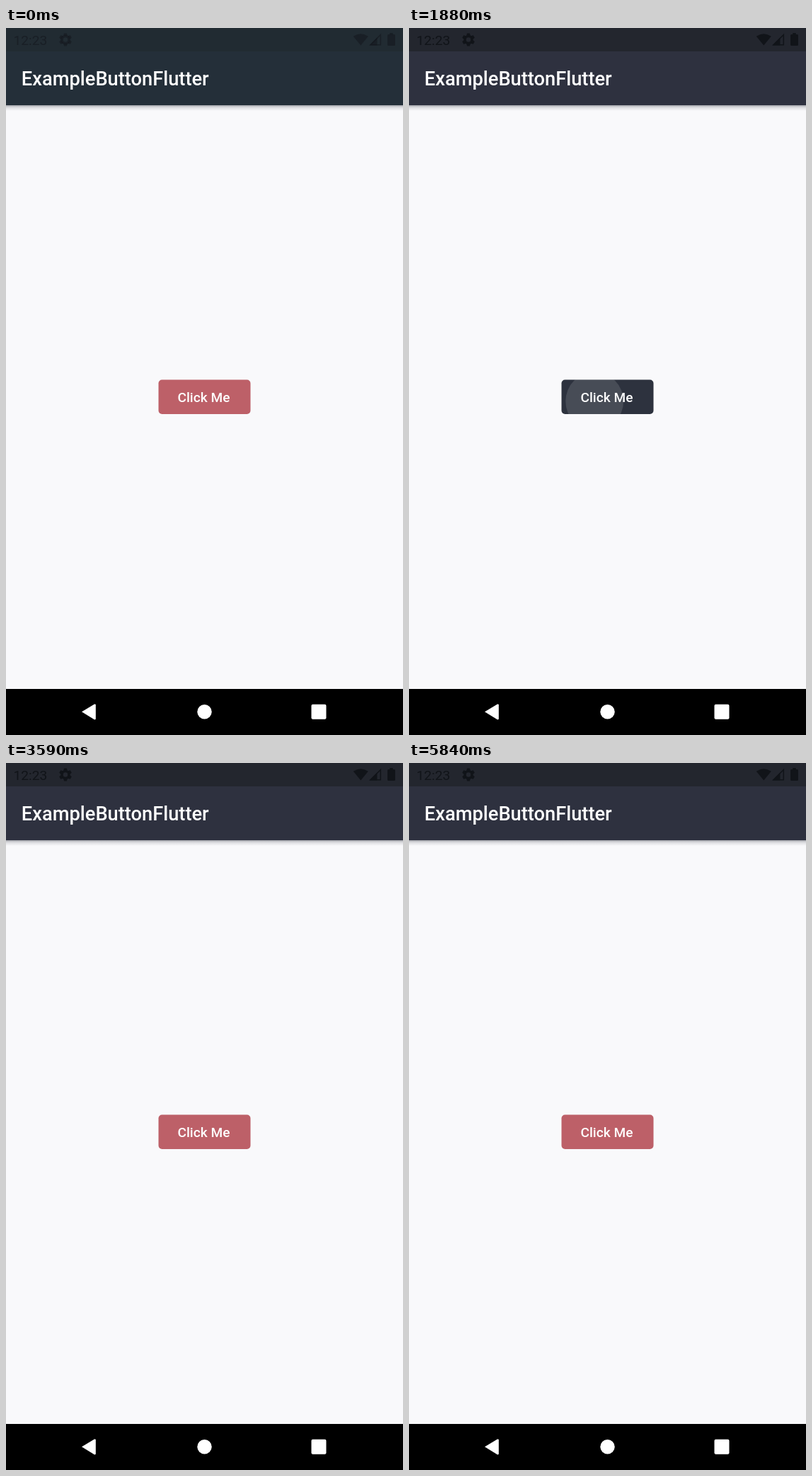
Animation, 561 px wide and 998 px high, one loop 5880 ms. Source, as an HTML page with a canvas:

```html
<!DOCTYPE html>
<html lang="en">
<head>
<meta charset="utf-8">
<title>ExampleButtonFlutter</title>
<style>
  html, body { margin: 0; width: 100%; height: 100%; overflow: hidden; background: #f9f9fb; }
  canvas { display: block; width: 561px; height: 998px; }
</style>
</head>
<body>
<canvas id="stage" width="561" height="998"></canvas>
<script>
const ctx = document.getElementById('stage').getContext('2d');
const LOOP = 5880;
const RED = '#bd6068', DARK = '#2d323e';
const BUTTON = { x: 215.5, y: 496.5, w: 130, h: 48.5, r: 5 };
const TAPS = [1760, 3060, 3760, 4960];
const TOGGLE_DELAY = 60;

const clamp = v => Math.max(0, Math.min(1, v));
const mix = (a, b, k) => a + (b - a) * k;
const smooth = k => k * k * (3 - 2 * k);

function rect(color, x, y, w, h) {
  ctx.fillStyle = color;
  ctx.fillRect(x, y, w, h);
}

function disc(color, x, y, r) {
  ctx.fillStyle = color;
  ctx.beginPath();
  ctx.arc(x, y, r, 0, Math.PI * 2);
  ctx.fill();
}

function polygon(color, points) {
  ctx.fillStyle = color;
  ctx.beginPath();
  points.forEach(([x, y]) => ctx.lineTo(x, y));
  ctx.closePath();
  ctx.fill();
}

function rounded(color, x, y, w, h, r) {
  ctx.fillStyle = color;
  ctx.beginPath();
  ctx.roundRect(x, y, w, h, r);
  ctx.fill();
}

function label(text, x, y, size, weight, color) {
  ctx.font = `${weight} ${size}px Roboto, sans-serif`;
  ctx.fillStyle = color;
  ctx.fillText(text, x, y);
}

function gear(color, x, y) {
  ctx.save();
  ctx.translate(x, y);
  ctx.fillStyle = color;
  ctx.beginPath();
  ctx.arc(0, 0, 6.6, 0, Math.PI * 2);
  ctx.arc(0, 0, 3.2, 0, Math.PI * 2, true);
  ctx.fill();
  for (let i = 0; i < 6; i++) {
    polygon(color, [[-2.8, -5.6], [-1.9, -9], [1.9, -9], [2.8, -5.6]]);
    ctx.rotate(Math.PI / 3);
  }
  ctx.restore();
}

function statusIcons(color) {
  label('12:23', 10.5, 24, 19.2, 400, color);
  gear(color, 84, 16.5);
  // Wi-Fi fan
  ctx.fillStyle = color;
  ctx.beginPath();
  ctx.moveTo(501.3, 24.5);
  ctx.lineTo(490.8, 11.7);
  ctx.quadraticCurveTo(501.3, 4.6, 511.8, 11.7);
  ctx.fill();
  // Signal strength
  polygon(color, [[513.5, 24.5], [524.5, 13.5], [524.5, 24.5]]);
  ctx.strokeStyle = color;
  ctx.lineWidth = 1.5;
  ctx.beginPath();
  ctx.moveTo(515, 23.8);
  ctx.lineTo(529.3, 9.5);
  ctx.lineTo(529.3, 23.8);
  ctx.closePath();
  ctx.stroke();
  // Battery
  rounded(color, 539, 9, 11, 16, 1.5);
  rect(color, 542.3, 7, 4.4, 2.5);
}

function appBar(sharpness) {
  const shade = (from, to) => `rgb(${from.map((c, i) => mix(c, to[i], sharpness)).join(',')})`;
  const shadow = ctx.createLinearGradient(0, 109, 0, 117);
  shadow.addColorStop(0, 'rgba(30,34,45,.38)');
  shadow.addColorStop(.4, 'rgba(30,34,45,.13)');
  shadow.addColorStop(1, 'rgba(30,34,45,0)');
  rect(shadow, 0, 109, 561, 8);
  rect(shade([36, 47, 57], [46, 49, 63]), 0, 0, 561, 109);
  rect(shade([33, 43, 50], [35, 38, 46]), 0, 0, 561, 33);
  ctx.globalAlpha = mix(.5, 1, sharpness);
  statusIcons('#111419');
  ctx.globalAlpha = 1;
  label('ExampleButtonFlutter', 21.8, 81, 27.27, 500, '#fff');
}

function ripple(age) {
  if (age < 0 || age > 475) return;
  const grow = smooth(clamp(age / 300));
  const alpha = .125 * clamp(age / 75) * (1 - clamp((age - 225) / 250));
  disc(`rgba(255,255,255,${alpha})`, mix(252, 280.5, grow), mix(530, 521, grow), mix(22, 75, grow));
}

function button(t) {
  const toggles = TAPS.filter(tap => t >= tap + TOGGLE_DELAY).length;
  const { x, y, w, h, r } = BUTTON;
  ctx.save();
  rounded(toggles % 2 ? DARK : RED, x, y, w, h, r);
  ctx.clip();
  TAPS.forEach(tap => ripple(t - tap));
  ctx.restore();
  label('Click Me', 242.5, 527.7, 19.1, 500, '#fff');
}

function navigation() {
  rect('#000', 0, 933, 561, 65);
  polygon('#fff', [[107, 965.3], [125.3, 954.2], [126.8, 955], [126.8, 975.6], [125.3, 976.4]]);
  disc('#fff', 280.5, 965.2, 10.2);
  rounded('#fff', 431.5, 954.8, 21, 21, 2);
}

function draw(t) {
  rect('#f9f9fb', 0, 0, 561, 998);
  appBar(t < 50 ? 0 : t < 90 ? .5 : 1);
  button(t);
  navigation();
}

const start = performance.now();
function frame() {
  draw((performance.now() - start) % LOOP);
  requestAnimationFrame(frame);
}
frame();
</script>
</body>
</html>
```
